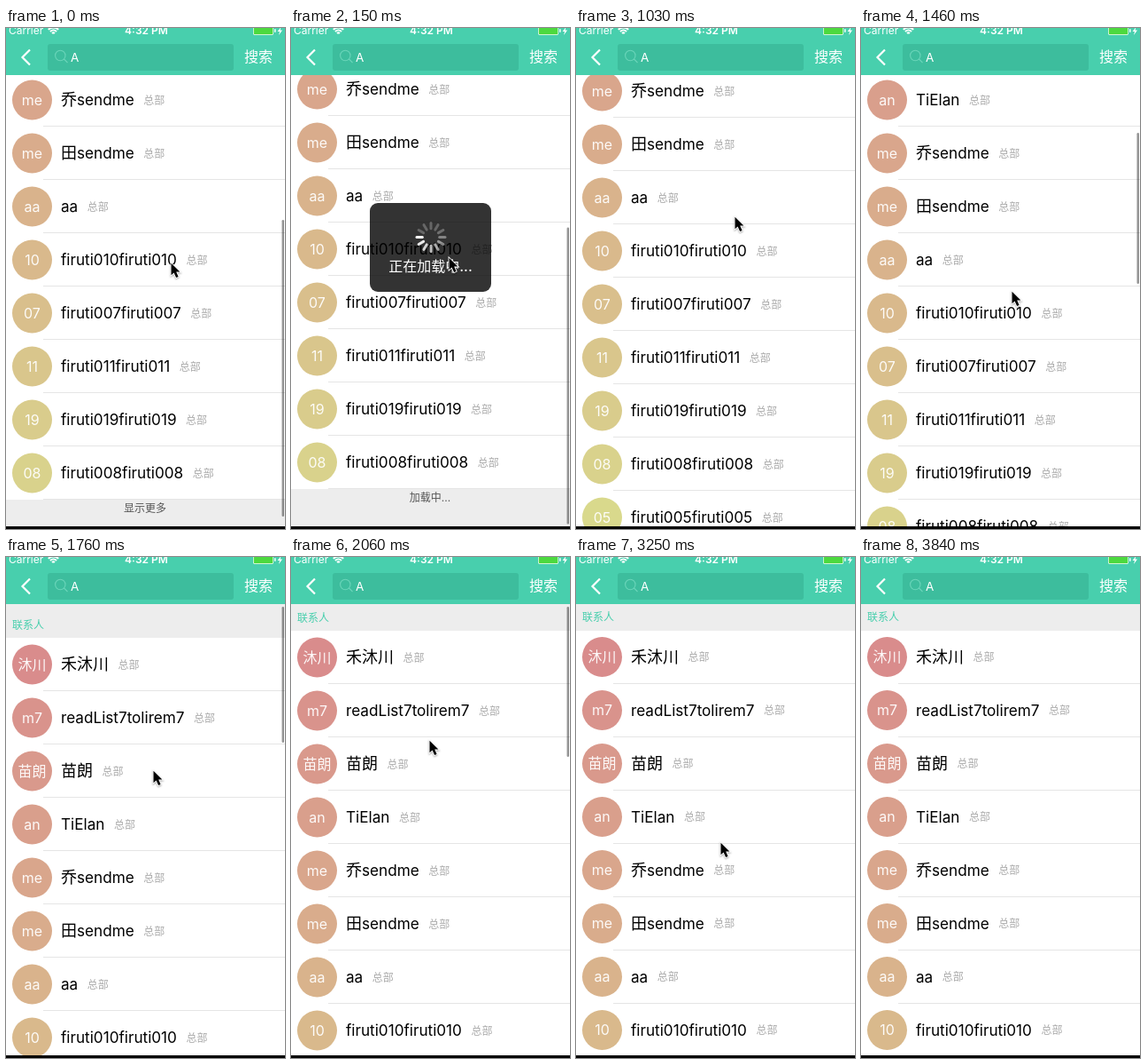
Recreate the animation shown at these times as an HTML page with a canvas. Size 315 by 564 pixels, loop 4200 ms.

```html
<!DOCTYPE html>
<html lang="zh">
<head>
<meta charset="utf-8">
<title>Contact search</title>
<style>
  html, body { margin: 0; width: 100%; height: 100%; overflow: hidden; background: #000; }
  canvas { display: block; width: 315px; height: 564px; }
</style>
</head>
<body>
<canvas id="stage"></canvas>
<script>
const W = 315, H = 564, LOOP = 4200;
const TOP = 53, BOTTOM = 561, ROW = 60, FIRST_ROW = 82.5;
const GREEN = '#48cfad';
const LOADING = 150, LOADED = 590;
const FONTS = 'Inter, "Noto Sans CJK SC", "Noto Sans CJK", sans-serif';

// [name, avatar label]
const contacts = [
  ['禾沐川', '沐川'], ['readList7tolirem7', 'm7'], ['苗朗', '苗朗'], ['TiElan', 'an'],
  ['乔sendme', 'me'], ['田sendme', 'me'], ['aa', 'aa'],
  ...['010', '007', '011', '019', '008', '005'].map(n => [`firuti${n}`.repeat(2), n.slice(1)])
];

// [time, value]: each value holds until the next one
const scrollSteps = [
  [0, 271.5], [150, 283.5], [440, 282.5], [590, 281.5], [1460, 211.5],
  [1610, 85], [1760, -8.5], [1910, -1], [2060, -.5], [2210, 0]
];
const cursorSteps = [
  [0, 186, 264], [150, 178, 258], [290, 177, 250], [440, 177, 247], [880, 176, 246],
  [1030, 179, 212], [1170, 177, 195], [1320, 174, 196], [1460, 170, 296], [1610, 168, 300],
  [1760, 166, 240], [1910, 160, 222], [2060, 156, 206], [2210, 152, 190], [2360, 150, 163],
  [2800, 157, 200], [2950, 168, 262], [3100, 168, 276], [3250, 163, 321], [3390, 168, 394],
  [3540, 172, 396], [3690, 265, 520], [3840, -99, -99]
];
const current = (steps, t) => steps.findLast(step => step[0] <= t);

const canvas = document.getElementById('stage');
const ctx = canvas.getContext('2d');
const dpr = window.devicePixelRatio || 1;
canvas.width = W * dpr;
canvas.height = H * dpr;

function rect(x, y, w, h, color, radius = 0) {
  ctx.fillStyle = color;
  ctx.beginPath();
  ctx.roundRect(x, y, w, h, radius);
  ctx.fill();
}

function line(path, color, width) {
  ctx.strokeStyle = color;
  ctx.lineWidth = width;
  ctx.stroke(new Path2D(path));
}

function text(string, x, y, size, color, align = 'left', weight = 400) {
  ctx.font = `${weight} ${size}px ${FONTS}`;
  ctx.fillStyle = color;
  ctx.textAlign = align;
  ctx.fillText(string, x, y);
  return ctx.measureText(string).width;
}

// Chinese glyphs are set slightly larger than Latin ones
function drawName(name, x, y) {
  for (const run of name.match(/[\x20-\x7e]+|[^\x20-\x7e]+/g))
    x += text(run, x, y, run.charCodeAt(0) < 128 ? 17.15 : 18, '#000');
  return x;
}

function drawRow([name, label], index, top) {
  const mid = top + ROW / 2;
  ctx.fillStyle = `hsl(${index * 5} 50% 70%)`;
  ctx.beginPath();
  ctx.arc(29.5, mid, 22.5, 0, 7);
  ctx.fill();
  text(label, 29.5, mid + 5.5, 16, 'rgba(255,255,255,.93)', 'center');
  const end = drawName(name, 62, mid + 6.3);
  text('总部', end + 10.5, mid + 4.5, 12, '#aaa');
  rect(42, Math.floor(top + ROW - .5), W - 42, 1, '#e5e5e5');
}

function drawList(t, scroll) {
  const rows = t < LOADED ? contacts.slice(0, 12) : contacts;
  const start = FIRST_ROW - scroll, end = start + rows.length * ROW;
  rect(0, TOP, W, BOTTOM - TOP, '#ededed');
  rect(0, Math.round(start), W, Math.round(end) - Math.round(start), '#fff');
  text('联系人', 7, start - 10.2, 12, GREEN);
  rows.forEach((row, i) => drawRow(row, i, start + i * ROW));
  if (t < LOADED)
    text(t < LOADING ? '显示更多' : '加载中...', 157, end + 13.7, 12, '#555', 'center');
}

function drawScrollbar(t, scroll) {
  const color = 'rgba(0,0,0,.42)';
  if (t < 740) rect(311.5, 216 + (scroll - 271.5) * .7, 2.5, 334, color, 1.25);
  else if (t >= 1460 && t < 2360)
    rect(311.5, 56 + Math.max(scroll, 0) * .293, 2.5, 170 + 2 * Math.min(scroll, 0), color, 1.25);
}

function drawHeader() {
  rect(0, 0, W, TOP, GREEN);
  text('Carrier', 3, 7.3, 12, '#fff');
  text('4:32 PM', 158.5, 7.3, 12, '#fff', 'center', 600);
  for (const r of [2, 5, 8]) {
    ctx.beginPath();
    ctx.arc(53.5, 7.5, r, -Math.PI * .75, -Math.PI * .25);
    ctx.strokeStyle = '#fff';
    ctx.lineWidth = 2;
    ctx.stroke();
  }
  rect(279, -3, 23, 11, '#fff', 2);
  rect(279.7, -2, 21.6, 9.3, '#4cd93f', 1.5);
  rect(303, 1, 1.5, 4, '#fff', 1);
  ctx.fillStyle = '#fff';
  ctx.fill(new Path2D('M310.5 -1L306.5 4H309L308 8L312 2.5H309.5Z'));

  line('M27 24.5L18.5 33L27 41.5', '#fff', 2.2);
  rect(47, 18, 210, 30, '#3dbd9d', 3);
  line('M67 31a5.7 5.7 0 1 1 -11.4 0a5.7 5.7 0 1 1 11.4 0M65.5 35L69.5 39', '#6bd5ba', 1.1);
  text('A', 73, 37.5, 13.5, '#fff');
  text('搜索', 269, 38, 16, '#fff');
}

function drawLoader(t) {
  rect(89, 197, 137, 100, 'rgba(0,0,0,.8)', 9);
  const lead = Math.round((current(cursorSteps, t)[0] - 440) / 83);
  ctx.lineCap = 'round';
  for (let i = 0; i < 12; i++) {
    const age = (lead - i + 24) % 12;
    ctx.save();
    ctx.translate(158, 235.5);
    ctx.rotate(i * Math.PI / 6);
    line('M0 -9.7V-16', `rgba(255,255,255,${Math.max(.25, 1 - age * .1)})`, 3);
    ctx.restore();
  }
  ctx.lineCap = 'butt';
  text('正在加载中...', 157.5, 273.5, 16, '#fff', 'center', 500);
}

const arrow = new Path2D('M.5 .8V14.3L3.6 11.4L6.1 17L8.6 15.9L6.2 10.5H10.4Z');
function drawCursor(x, y) {
  ctx.save();
  ctx.translate(x, y);
  ctx.shadowColor = 'rgba(0,0,0,.35)';
  ctx.shadowBlur = 2 * dpr;
  ctx.shadowOffsetY = dpr;
  ctx.strokeStyle = '#fff';
  ctx.lineWidth = 1.8;
  ctx.stroke(arrow);
  ctx.shadowColor = 'transparent';
  ctx.fillStyle = '#000';
  ctx.fill(arrow);
  ctx.restore();
}

function draw(now) {
  const t = now % LOOP;
  const scroll = current(scrollSteps, t)[1];
  const [, x, y] = current(cursorSteps, t);
  ctx.setTransform(dpr, 0, 0, dpr, 0, 0);
  drawList(t, scroll);
  drawScrollbar(t, scroll);
  drawHeader();
  rect(0, BOTTOM, W, H - BOTTOM, '#000');
  if (t >= LOADING && t < LOADED) drawLoader(t);
  drawCursor(x, y);
}

const began = performance.now();
function tick() {
  draw(performance.now() - began);
  requestAnimationFrame(tick);
}
tick();
</script>
</body>
</html>
```
